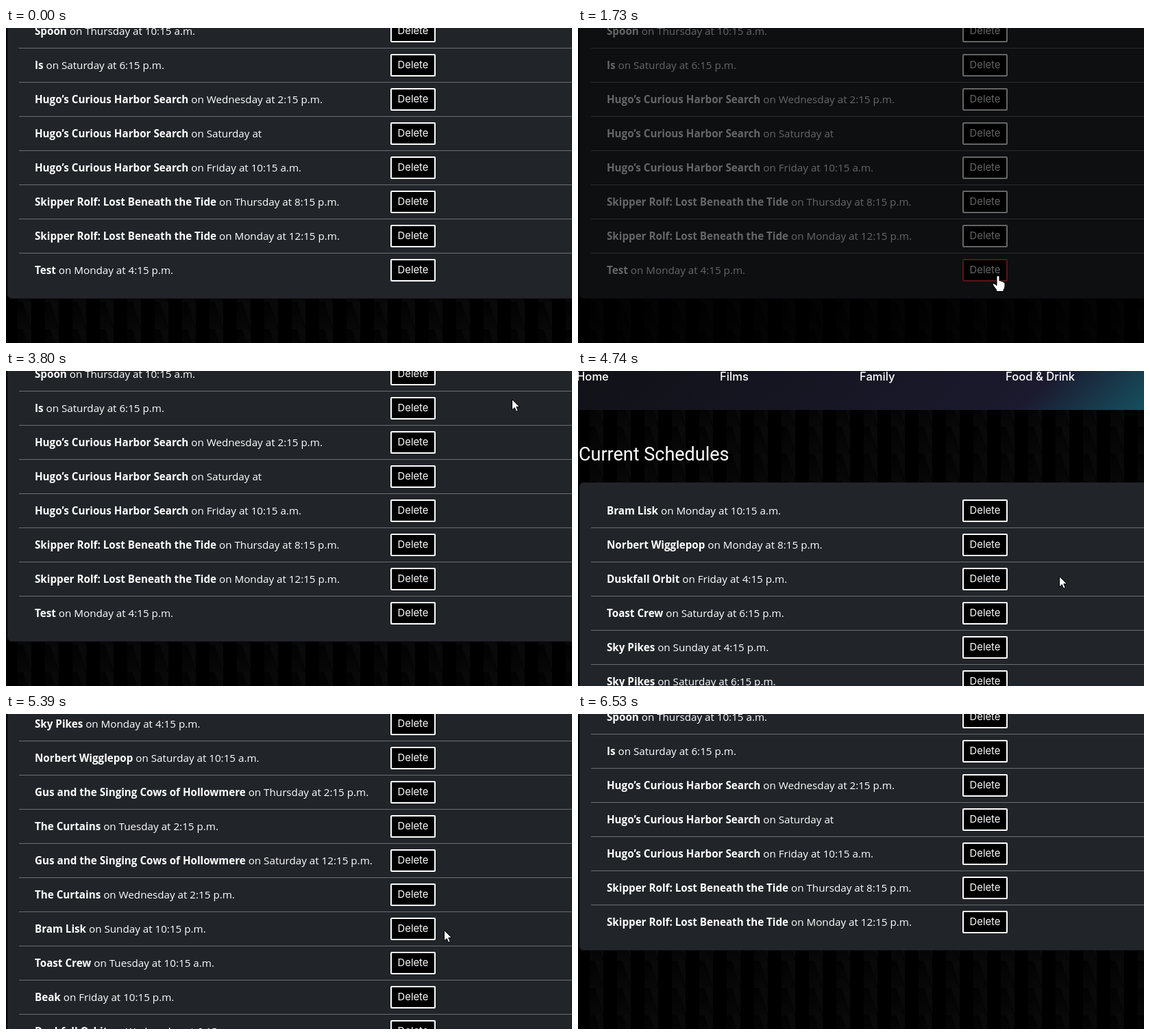
An HTML page that plays this animation: 826x461 px, repeating every 7.14 s.

```html
<!DOCTYPE html>
<html lang="en">
<head>
<meta charset="utf-8">
<title>Schedules</title>
<style>
  html, body { margin: 0; width: 100%; height: 100%; overflow: hidden; background: #000; }
  #stage { position: relative; width: 826px; height: 461px; overflow: hidden; color: #fff; }
  #stage * { box-sizing: border-box; }
  #page { position: absolute; left: 0; top: 0; width: 826px; height: 1800px; }
  #tiles, #cursor { position: absolute; left: 0; top: 0; width: 100%; height: 100%; }
  nav { position: absolute; left: 0; top: 0; width: 826px; height: 57px;
    background: linear-gradient(135deg, #111117, #1b1a2e 79%, #15505f);
    font: 500 16.6px/20px Inter, sans-serif; }
  nav span { position: absolute; top: -2px; white-space: nowrap; }
  h1 { position: absolute; left: 1px; top: 102px; margin: 0; white-space: nowrap;
    font: 400 27px/40px Roboto, sans-serif; font-stretch: 75%; }
  ul { position: absolute; left: 2px; top: 163px; width: 900px; margin: 0; padding: 16px;
    list-style: none; background: #212529; border: 1px solid #1b1e21; border-radius: 6px; }
  li { position: relative; height: 50px; padding-left: 23px; border-bottom: 1px solid #6a6f73;
    font: 15.2px/49px "Open Sans", sans-serif; white-space: nowrap; }
  li:last-child { height: 49px; border: 0; }
  li i { position: absolute; left: 542px; top: 8px; width: 66px; height: 33px;
    border: 2px solid #fff; border-radius: 2px; background: #000; text-align: center;
    font: 400 14.8px/28px Inter, sans-serif; }
  li i.hot { border-color: #dc3545; }
  #dim { position: absolute; inset: 0; background: #000; }
  #dialog { position: absolute; left: 432px; top: -80px; width: 450px; height: 150px;
    background: #1f1f1f; border: 1px solid #474747; border-radius: 12px; }
  #dialog b { position: absolute; top: 90px; height: 38px; border-radius: 19px;
    font: 500 13px/38px Roboto, sans-serif; }
  #ok { left: 276px; width: 74px; background: #a8c7fa; color: #062e6f; text-align: center;
    box-shadow: 0 0 0 2px #1f1f1f, 0 0 0 4px #a8c7fa; }
  #ok.hot { background: #a5bfec; }
  #cancel { left: 357px; width: 86px; padding-left: 16px; background: #004a77; color: #c2e7ff; }
</style>
</head>
<body>
<div id="stage">
  <div id="page">
    <svg id="tiles">
      <defs>
        <linearGradient id="fade" x2="0" y2="1"><stop stop-color="#020202"/><stop offset="1" stop-color="#080808"/></linearGradient>
        <pattern id="tile" y="1" width="40" height="40" patternUnits="userSpaceOnUse">
          <path d="M17 0H25L36 40H17Z" fill="url(#fade)"/>
          <path d="M25 0H37V40Z" fill="#090909"/>
        </pattern>
      </defs>
      <rect width="100%" height="100%" fill="url(#tile)"/>
    </svg>
    <nav>
      <span style="left:-2px">Home</span><span style="left:207px">Films</span>
      <span style="left:411px">Family</span><span style="left:624px">Food &amp; Drink</span>
    </nav>
    <h1>Current Schedules</h1>
    <ul id="list"></ul>
  </div>
  <div id="dim"></div>
  <div id="dialog"><b id="ok">OK</b><b id="cancel">Cancel</b></div>
  <svg id="cursor" stroke="#000" fill="#fff" stroke-linejoin="round">
    <path id="arrow" d="M.5 .5V16L4.2 12.6L6.7 18.3L9.3 17.2L6.8 11.6H11.6Z"/>
    <path id="hand" d="M-2 1.5Q-2 -.5 0 -.5T2 1.5V7Q4 6 5 8Q7 7 7.5 9Q10 8.5 10 11V15Q10 18 8 20V22.5H-2.5V20L-7 14Q-8.5 11.5 -6.5 11Q-5 10.5 -2 14Z"/>
  </svg>
</div>
<script>
const LOOP = 7140;
const $ = id => document.getElementById(id);

const bram = "Bram Lisk", norbert = "Norbert Wigglepop", orbit = "Duskfall Orbit",
  toast = "Toast Crew", pikes = "Sky Pikes", cows = "Gus and the Singing Cows of Hollowmere",
  curtains = "The Curtains", beak = "Beak", spoon = "Spoon",
  hugo = "Hugo’s Curious Harbor Search", rolf = "Skipper Rolf: Lost Beneath the Tide";

const shows = [
  [bram, "Monday", "10:15 a.m."], [norbert, "Monday", "8:15 p.m."],
  [orbit, "Friday", "4:15 p.m."], [toast, "Saturday", "6:15 p.m."],
  [pikes, "Sunday", "4:15 p.m."], [pikes, "Saturday", "6:15 p.m."],
  [pikes, "Friday", "2:15 p.m."], [pikes, "Monday", "4:15 p.m."],
  [norbert, "Saturday", "10:15 a.m."], [cows, "Thursday", "2:15 p.m."],
  [curtains, "Tuesday", "2:15 p.m."], [cows, "Saturday", "12:15 p.m."],
  [curtains, "Wednesday", "2:15 p.m."], [bram, "Sunday", "10:15 p.m."],
  [toast, "Tuesday", "10:15 a.m."], [beak, "Friday", "10:15 p.m."],
  [orbit, "Wednesday", "6:15 p.m."], [spoon, "Saturday", "4:15 p.m."],
  [beak, "Monday", "6:15 p.m."], [orbit, "Thursday", "4:15 p.m."],
  [spoon, "Thursday", "10:15 a.m."], ["Is", "Saturday", "6:15 p.m."],
  [hugo, "Wednesday", "2:15 p.m."], [hugo, "Saturday", ""],
  [hugo, "Friday", "10:15 a.m."], [rolf, "Thursday", "8:15 p.m."],
  [rolf, "Monday", "12:15 p.m."], ["Test", "Monday", "4:15 p.m."]
];
const fill = rows => $("list").innerHTML = rows.map(([name, day, time]) =>
  `<li><b>${name}</b> on ${day} at ${time}<i>Delete</i></li>`).join("");

const clamp = v => Math.min(1, Math.max(0, v));
const ramp = (t, a, b) => clamp((t - a) / (b - a));
const smooth = p => p * p * (3 - 2 * p);
const easeOut = p => 1 - (1 - p) ** 2;
const easeIn = p => p * p;
const linear = p => p;

// Cursor keys: time, x, y, easing towards this key
const keys = [
  [250, 731, 464], [710, 613, 363, easeOut],
  [2070, 613, 363], [2800, 742, 27, smooth],
  [2820, 742, 27], [2970, 738, 36, smooth],
  [3740, 738, 36], [4460, 718, 283, smooth],
  [4740, 702, 300, linear], [5390, 639, 316, smooth], [5720, 631, 300, smooth],
  [6290, 631, 300], [6530, 659, 463, easeIn]
];
function cursorAt(t) {
  const n = keys.findIndex(k => k[0] > t);
  if (n < 1) return [0, 600];
  const [t0, x0, y0] = keys[n - 1], [t1, x1, y1, ease = linear] = keys[n];
  const p = ease(ramp(t, t0, t1));
  return [x0 + (x1 - x0) * p, y0 + (y1 - y0) * p].map(Math.round);
}

const RELOAD = 4600;
let reloaded;

function draw(t) {
  if (reloaded !== t >= RELOAD) {
    reloaded = t >= RELOAD;
    fill(reloaded ? shows.slice(0, -1) : shows);
  }
  const flicks = smooth(ramp(t, 5230, 5430)) + smooth(ramp(t, 5620, 5820));
  const scroll = reloaded ? Math.round(600 * flicks) : 1200;
  $("page").style.transform = `translateY(${-scroll}px)`;

  const closing = ramp(t, 3120, 3450);
  $("dim").style.opacity = .6 * (ramp(t, 1600, 1730) - closing);
  $("dialog").style.opacity = ramp(t, 1740, 1920) * (1 - ramp(t, 3120, 3280));

  const [x, y] = cursorAt(t);
  const onButton = !reloaded && x >= 561 && x < 627 && y >= 338 && y < 371;
  const pressed = t > 1600 && t < 3300;
  $("list").lastChild.lastChild.className = !reloaded && (onButton || pressed) ? "hot" : "";
  $("ok").className = x >= 709 && x < 782 && y >= 11 && y < 49 ? "hot" : "";
  for (const id of ["arrow", "hand"]) {
    $(id).setAttribute("transform", `translate(${x} ${y})`);
    $(id).style.display = (id === "hand") === onButton ? "" : "none";
  }
}

function tick() {
  draw(performance.now() % LOOP);
  requestAnimationFrame(tick);
}
tick();
</script>
</body>
</html>
```
